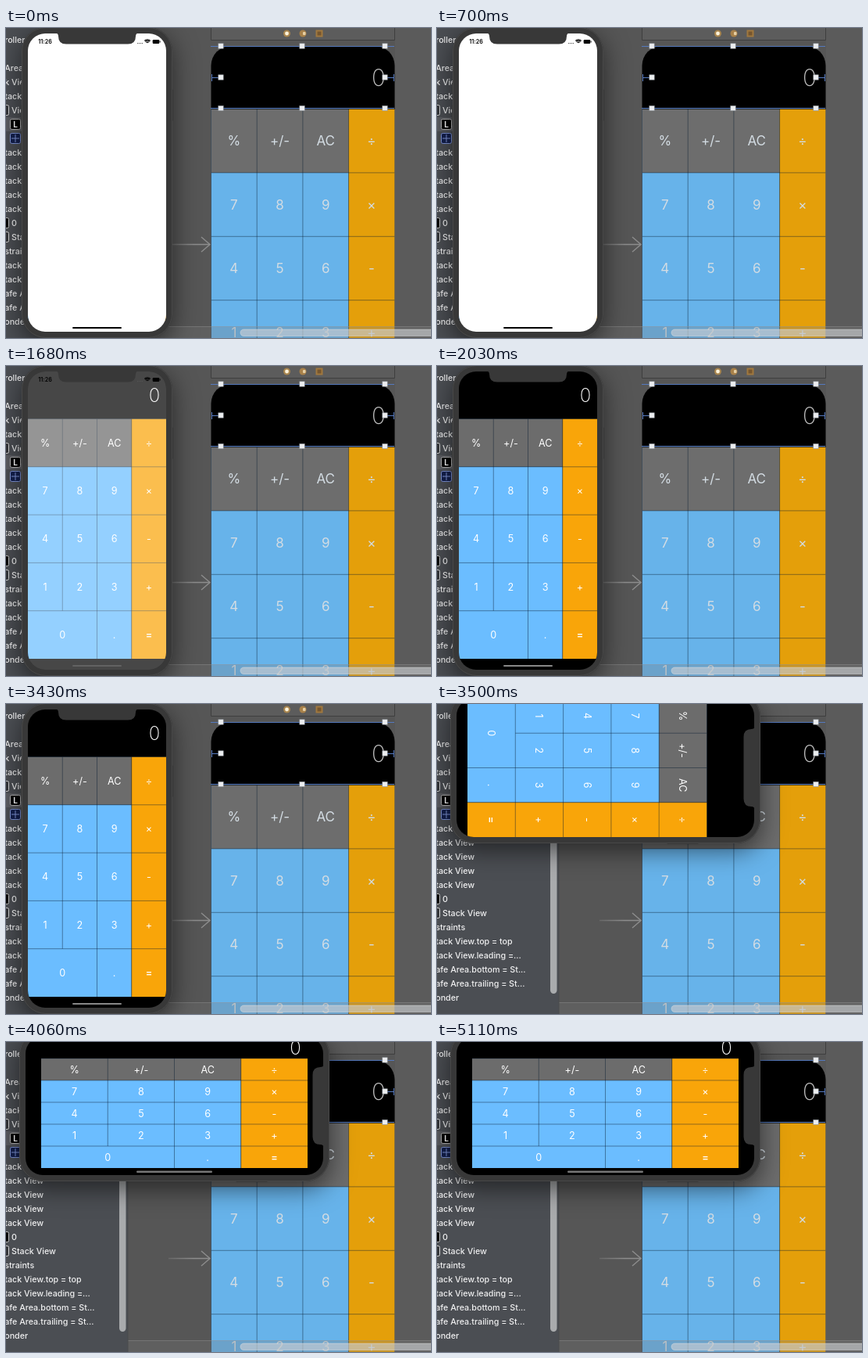
Write an HTML page with a canvas that moves like this. It is 544x396 px and loops after 5180 ms.

```html
<!DOCTYPE html>
<html>
<head>
<meta charset="utf-8">
<style>
html, body { margin: 0; width: 100%; height: 100%; overflow: hidden; background: #585858; }
canvas { display: block; width: 544px; height: 396px; }
</style>
</head>
<body>
<canvas id="stage"></canvas>
<script>
const W = 544, H = 396, LOOP = 5180;
const FADE_AT = 1492, FADE_MS = 290;
const TURN_AT = 3500, TURN_MS = 520;
const FONT = 'Inter, "Open Sans", sans-serif';
const KEYS = [
  ['%', '+/-', 'AC', '÷'],
  ['7', '8', '9', '×'],
  ['4', '5', '6', '-'],
  ['1', '2', '3', '+'],
  ['0', '', '.', '=']
];
const PHONE = { gray: '#6c6c6c', blue: '#6bbdff', orange: '#f9a509', text: '#fff' };
const BOARD = { gray: '#6d6d6d', blue: '#67b3ea', orange: '#e49f0a', text: '#d3dce3' };

const canvas = document.getElementById('stage');
const dpr = window.devicePixelRatio || 1;
canvas.width = W * dpr;
canvas.height = H * dpr;
const ctx = canvas.getContext('2d');

const clamp = v => Math.max(0, Math.min(1, v));
const mix = (a, b, t) => a + (b - a) * t;
const ease = v => { v = clamp(v); return v * v * (3 - 2 * v); };

function rect(x, y, w, h, color) {
  ctx.fillStyle = color;
  ctx.fillRect(x, y, w, h);
}

function roundPath(x, y, w, h, r) {
  ctx.beginPath();
  ctx.roundRect(x, y, w, h, r);
}

function pill(x, y, w, h, r, color) {
  roundPath(x, y, w, h, r);
  ctx.fillStyle = color;
  ctx.fill();
}

function line(points, color, width = 1) {
  ctx.beginPath();
  points.forEach(([x, y]) => ctx.lineTo(x, y));
  ctx.strokeStyle = color;
  ctx.lineWidth = width;
  ctx.stroke();
}

// y is the middle of the capital letters
function label(str, x, y, size, color, weight = 400, align = 'center') {
  ctx.font = `${weight} ${size}px ${FONT}`;
  ctx.textAlign = align;
  ctx.fillStyle = color;
  ctx.fillText(str, x, y + size * 0.36);
}

function keypad(x, y, cw, ch, size, c) {
  rect(x, y, cw * 3, ch, c.gray);
  rect(x, y + ch, cw * 3, ch * 4, c.blue);
  rect(x + cw * 3, y, cw, ch * 5, c.orange);
  const ink = 'rgba(10,30,50,0.5)';
  for (let r = 0; r <= 4; r++) line([[x, y + r * ch], [x + cw * 4, y + r * ch]], ink, 0.9);
  for (let k = 1; k <= 3; k++) {
    const rows = k === 1 ? 4 : 5;
    line([[x + k * cw, y], [x + k * cw, y + rows * ch]], ink, 0.9);
  }
  KEYS.forEach((row, r) => row.forEach((key, k) => {
    const col = key === '0' ? 1 : k + 0.5;
    label(key, x + col * cw, y + (r + 0.5) * ch, size, c.text, key === '=' ? 600 : 400);
  }));
}

function sidebar() {
  rect(0, 0, 156, H, '#4b4e53');
  rect(155, 0, 1.5, H, '#4a4c4f');
  rect(0, 114, 145, 18, '#5b5d62');
  const rows = ['roller', '', 'Area', 'k View', 'tack View', '', '', '',
    'tack View', 'tack View', 'tack View', 'tack View', 'tack View', '', '',
    'straints', 'tack View.top = top', 'tack View.leading =...',
    'afe Area.bottom = St...', 'afe Area.trailing = St...', 'onder'];
  const text = (s, x, y) => label(s, x, y, 10.7, '#f0f0f1', 500, 'left');
  rows.forEach((s, i) => text(s, -1.8, 15 + i * 18));
  text('View', 7, 105);
  text('0', 7, 249);
  text('Stack View', 7, 267);

  const box = (x, y, fill, edge) => {
    roundPath(x, y - 6.5, 13, 13, 2);
    ctx.fillStyle = fill;
    ctx.fill();
    ctx.strokeStyle = edge;
    ctx.lineWidth = 1;
    ctx.stroke();
  };
  box(-9.5, 105, '#34363a', '#d8d8d8');
  box(5.5, 123, '#000', '#b8b8b8');
  label('L', 12, 123, 10, '#fff', 700);
  box(5.5, 141, '#14204e', '#8298dc');
  line([[12, 136], [12, 146]], '#8298dc');
  line([[7, 141], [17, 141]], '#8298dc');
  box(-9.5, 249, '#000', '#c8c8c8');
  box(-9.5, 267, '#34363a', '#d8d8d8');
  pill(145, 60, 8.5, 310, 4.2, '#a9abad');
}

function storyboard() {
  rect(156, 0, W - 156, H, '#565656');
  rect(498, 0, W - 498, H, '#5b5b5b');

  rect(262, 0, 236, 15, '#5c5c5c');
  line([[262.5, 0], [262.5, 15.5], [497.5, 15.5], [497.5, 0]], '#3e3e3e');
  const dot = (x, r, color) => pill(x - r, 7 - r, r * 2, r * 2, r, color);
  dot(359.5, 4.5, '#a8854e');
  dot(359.5, 2.4, '#fff4dc');
  dot(380, 4.5, '#a8814a');
  pill(380, 5, 3.5, 4, 1, '#e6cfa4');
  rect(396.5, 2.5, 9, 9, '#a0783f');
  rect(398.5, 4.5, 5, 5, '#76562f');

  pill(262.5, 23, 235, 81, [25, 25, 0, 0], '#000');
  label('0', 477, 63.5, 29.5, '#c0c0c0', 200);
  keypad(262.5, 103.5, 58.7, 81.4, 17, BOARD);
  line([[262.5, 103], [262.5, H]], '#3a4a58', 0.8);

  const blue = '#5579bd';
  line([[262, 23.5], [497, 23.5]], blue);
  line([[262, 102.5], [497, 102.5]], blue);
  line([[263.5, 59], [263.5, 68]], blue);
  line([[263, 63.5], [275, 63.5]], blue);
  line([[485, 63.5], [497, 63.5]], blue);
  line([[496.5, 59], [496.5, 68]], blue);
  for (const x of [275, 379, 485]) {
    for (const y of [23, 63, 102.5]) {
      if (x === 379 && y === 63) continue;
      rect(x - 3.2, y - 3.2, 6.4, 6.4, '#eceef0');
      ctx.strokeStyle = '#8a8f96';
      ctx.lineWidth = 0.6;
      ctx.strokeRect(x - 3.2, y - 3.2, 6.4, 6.4);
    }
  }

  const fade = ctx.createLinearGradient(206, 0, 240, 0);
  fade.addColorStop(0, '#666');
  fade.addColorStop(1, '#8d8d8d');
  line([[208, 276.5], [261, 276.5]], fade, 1.4);
  line([[250, 267], [261, 276.5], [250, 286]], '#8d8d8d', 1.4);

  rect(156, 381, W - 156, 15, 'rgba(120,120,120,0.28)');
  line([[156, 381.5], [W, 381.5]], 'rgba(150,150,150,0.4)');
  roundPath(300, 385, 270, 8.5, 4.2);
  ctx.fillStyle = 'rgba(205,208,212,0.62)';
  ctx.fill();
  ctx.strokeStyle = 'rgba(235,235,235,0.5)';
  ctx.lineWidth = 0.8;
  ctx.stroke();
}

function statusBar() {
  label('11:26', -66.5, -180, 7.2, '#000', 600);
  for (let i = 0; i < 4; i++) rect(51.5 + i * 2, -178.5, 1.1, 1.1, '#555');
  ctx.strokeStyle = '#000';
  ctx.lineWidth = 1.2;
  for (const r of [2, 3.8, 5.4]) {
    ctx.beginPath();
    ctx.arc(64.5, -177.3, r, -Math.PI * 0.75, -Math.PI * 0.25);
    ctx.stroke();
  }
  pill(71.2, -182.5, 8.6, 5, 1.2, '#000');
  rect(80.2, -181, 0.9, 2, '#000');
}

// On turning, the display takes its full new width at once and slides in with its left edge.
function app(turn, turned) {
  const m = (a, b) => mix(a, b, turn);
  rect(-300, -300, 600, 600, '#000');
  label('0', turned ? m(237, 155) : 73.5, m(-160, -74.5), 24, '#fff', 250);
  keypad(m(-88.5, -170.5), m(-130, -60.5), m(44.25, 85.25), m(61.3, 28), 12.6, PHONE);
}

function phone(shown, turn, turned) {
  const angle = turned ? Math.PI / 2 : 0;
  ctx.save();
  if (turned) ctx.translate(215.5, 81.5);
  else ctx.translate(116.5, 197.5);
  ctx.rotate(angle);

  ctx.save();
  ctx.shadowColor = 'rgba(0,0,0,0.55)';
  ctx.shadowBlur = 32 * dpr;
  ctx.shadowOffsetY = 9 * dpr;
  pill(-96.5, -198.5, 193, 397, 31, '#383838');
  ctx.restore();
  pill(96, -119, 1.5, 40, 0.7, '#363636');
  for (const [y, h] of [[-128, 14], [-99, 26], [-66, 26]]) pill(-97.5, y, 1.5, h, 0.7, '#363636');
  pill(-96.5, -198.5, 193, 397, 31, '#383838');
  roundPath(-96, -198, 192, 396, 30.5);
  ctx.strokeStyle = '#484848';
  ctx.lineWidth = 1;
  ctx.stroke();

  ctx.save();
  roundPath(-88.5, -190.5, 177, 381, 22);
  ctx.clip();
  ctx.rotate(-turn * Math.PI / 2);
  app(turn, turned);
  if (shown < 1) {
    rect(-90, -192, 180, 384, `rgba(255,255,255,${1 - shown})`);
    statusBar();
  }
  ctx.restore();

  // home indicator
  ctx.save();
  ctx.rotate(-angle);
  const g = Math.round(136 * shown);
  if (turned) {
    ctx.globalAlpha = clamp((turn - 0.6) / 0.4);
    pill(-48.5, 83, 97, 2.6, 1.3, '#777');
  } else {
    pill(-31.5, 184.4, 63, 2.2, 1.1, `rgb(${g},${g},${g})`);
  }
  ctx.restore();

  // notch with flared shoulders
  ctx.beginPath();
  ctx.moveTo(-53, -191.5);
  ctx.quadraticCurveTo(-49.5, -190.5, -49.5, -187);
  ctx.quadraticCurveTo(-49.5, -177, -39.5, -177);
  ctx.lineTo(39.5, -177);
  ctx.quadraticCurveTo(49.5, -177, 49.5, -187);
  ctx.quadraticCurveTo(49.5, -190.5, 53, -191.5);
  ctx.closePath();
  ctx.fillStyle = '#383838';
  ctx.fill();
  ctx.restore();
}

function draw(ms) {
  ctx.setTransform(dpr, 0, 0, dpr, 0, 0);
  storyboard();
  sidebar();
  phone(ease((ms - FADE_AT) / FADE_MS), ease((ms - TURN_AT) / TURN_MS), ms >= TURN_AT);
}

const start = performance.now();
function tick() {
  draw((performance.now() - start) % LOOP);
  requestAnimationFrame(tick);
}
tick();
</script>
</body>
</html>
```
